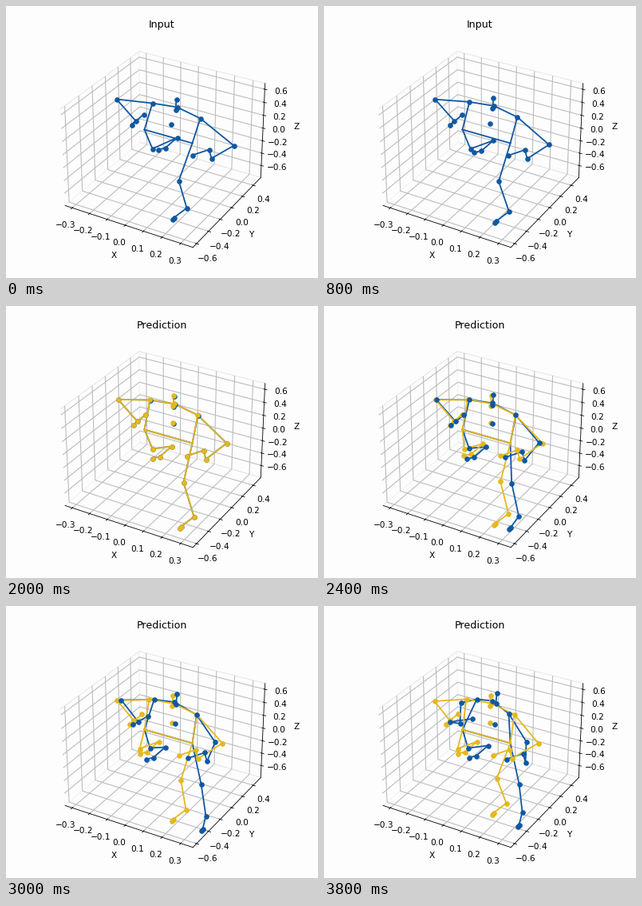
Write a matplotlib script that moves like this. It is 391 px wide and 340 px high and loops after 4 s.

```python
import numpy as np
import matplotlib.pyplot as plt
from matplotlib.animation import FuncAnimation

W, H, DPI = 391, 340, 72
STEP, FRAMES = 200, 20
START, SWITCH, MID, END = 0, 2000, 3000, 3800
BLUE, GOLD = "#1058a2", "#e6b81e"

# First pose, in screen pixels
POSE = dict(
    spine=(206, 147), neck=(214, 126), nose=(212, 129), top=(213, 116),
    r_shoulder=(183, 121), r_elbow=(138, 116), r_wrist=(162, 143),
    r_thumb=(157, 148), r_hand=(172, 135),
    l_shoulder=(243, 140), l_elbow=(285, 174), l_wrist=(257, 190),
    l_thumb=(254, 179), l_hand=(233, 186),
    r_knee=(183, 178), r_ankle=(214, 164), r_foot=(199, 177), r_toe=(190, 179),
    l_knee=(216, 218), l_ankle=(226, 252), l_foot=(210, 264), l_toe=(208, 266),
)
HIPS = dict(r_hip=(173, 154), l_hip=(233, 171))

CHAINS = [["r_hip", "l_hip"], ["neck", "nose", "top"]] + [
    [part if part == "neck" else f"{side}_{part}" for part in chain.split()]
    for side in "rl"
    for chain in ("hip knee ankle foot toe",
                  "hip shoulder",
                  "neck shoulder elbow wrist thumb hand")
]

HEAD = "neck nose top"
R_PALM, L_PALM = "r_wrist r_thumb r_hand", "l_wrist l_thumb l_hand"
R_SOLE, L_SOLE = "r_ankle r_foot r_toe", "l_ankle l_foot l_toe"

# Moves: joints, dx, dy, begin, finish, power of the ease
INPUT_MOVES = [
    ("spine", 3, -1, START, SWITCH, 1),
    (HEAD + " r_shoulder l_shoulder", -3, -4, START, SWITCH, 1),
    ("r_elbow " + R_PALM, 2, 0.5, START, SWITCH, 1),
    ("l_elbow", -9, -3, START, SWITCH, 1),
    (L_PALM, -7, 1, START, SWITCH, 1),
    (R_SOLE, -7, 11, START, SWITCH, 1.2),
    ("l_knee", 6, 2, START, SWITCH, 1),
    (L_SOLE, 9, 11, START, SWITCH, 1),
]
TRUE_MOVES = [
    ("spine", 4, 1, SWITCH, END, 0.8),
    ("neck", -1, -4, SWITCH, END, 0.8),
    ("nose top", 6, -4, SWITCH, END, 0.8),
    ("r_shoulder", 11, -1, SWITCH, END, 1.3),
    ("r_elbow", 31, 4, SWITCH, END, 3.5),
    ("r_wrist", 6, 3, SWITCH, END, 3),
    ("r_thumb", -2, -4, SWITCH, END, 3),
    ("r_hand", 11, 5, SWITCH, END, 2),
    ("l_shoulder", -9, -2, SWITCH, END, 3),
    ("l_elbow", -23, -2, SWITCH, END, 0.8),
    (L_PALM, 2, 4, SWITCH, END, 0.6),
    ("r_knee", -3, -1, SWITCH, MID, 0.6),
    (R_SOLE, -8, 1, SWITCH, MID, 0.6),
    (R_SOLE, 6, -2, MID, END, 1),
    ("l_knee", 22, 2, SWITCH, MID, 0.6),
    ("l_ankle", 15, -1, SWITCH, MID, 0.6),
    ("l_foot l_toe", 27, 3, SWITCH, MID, 0.7),
    (L_SOLE, -2, -5, MID, END, 1),
]
GUESS_MOVES = [
    ("spine r_shoulder l_shoulder " + HEAD, -2, -1, SWITCH - STEP, END, 1),
    ("r_elbow", -2, 2, SWITCH, END, 1),
    (R_PALM, -7, -1, SWITCH, END, 0.9),
    ("l_elbow", -8, 0, SWITCH, END, 0.7),
    (L_PALM, -15, -1, SWITCH, END, 0.7),
    ("r_knee", -16, 0, SWITCH, MID, 0.8),
    (R_SOLE, -16, -6, SWITCH, MID, 0.7),
    ("l_knee", -6, -5, SWITCH, END, 1),
    (L_SOLE, -10, -9, SWITCH, MID, 0.9),
    (L_SOLE, 3, -8, MID, END, 1),
]


def pose_at(t, moves):
    pts = {name: np.array(p, float) for name, p in POSE.items()}
    for names, dx, dy, begin, finish, power in moves:
        u = np.clip((t - begin) / (finish - begin), 0, 1) ** power
        for name in names.split():
            pts[name] += (dx * u, dy * u)
    # The standing foot wobbles once before the switch.
    wobble = 3 * np.sin(2 * np.pi * min(t / SWITCH, 1))
    for name in L_SOLE.split():
        pts[name][0] += wobble
    return pts


class Skeleton:
    def __init__(self, ax, moves, color, z):
        self.moves = moves
        self.lines = [ax.plot([], [], color=color, lw=1.8, zorder=z)[0] for _ in CHAINS]
        zeros = np.zeros(len(POSE))
        self.dots = ax.scatter(zeros, zeros, s=31, color=color, lw=1, zorder=z + 5)

    def show(self, on):
        for artist in [*self.lines, self.dots]:
            artist.set_visible(on)

    def update(self, t):
        pts = pose_at(t, self.moves)
        self.dots.set_offsets(list(pts.values()))
        pts.update(HIPS)
        for line, chain in zip(self.lines, CHAINS):
            line.set_data(*zip(*(pts[name] for name in chain)))


plt.rcParams.update({"grid.color": "#bcbcbc", "grid.linewidth": 1.1})
fig = plt.figure(figsize=(W / DPI, H / DPI), dpi=DPI, facecolor="#fdfdfd")

# Empty 3D box
side = 285
box = fig.add_axes([52.6 / W, 20.3 / H, side / W, side / H], projection="3d")
box.patch.set_visible(False)
box.set(xlim=(-0.341, 0.364), ylim=(-0.659, 0.545), zlim=(-0.797, 0.689))
box.set_xticks(np.arange(-3, 4) / 10)
box.set_yticks(np.arange(-3, 3) / 5)
box.set_zticks(np.arange(-3, 4) / 5)
box.tick_params(labelsize=10.5, pad=4.1)
for axis, name in zip((box.xaxis, box.yaxis, box.zaxis), "XYZ"):
    axis.set_label_text(name, fontsize=10.5)
    axis.labelpad = 5.25
    axis.set_pane_color("#fdfdfd")
    axis.pane.set_edgecolor("0.9")

# Flat layer in screen pixels
stage = fig.add_axes([0, 0, 1, 1], facecolor="none")
stage.axis("off")
truth = Skeleton(stage, INPUT_MOVES + TRUE_MOVES, BLUE, 2)
guess = Skeleton(stage, INPUT_MOVES + GUESS_MOVES, GOLD, 3)
title = stage.text(194.5, 27, "", fontsize=12.6, ha="center", va="baseline")
stage.set(xlim=(-0.5, W - 0.5), ylim=(H - 0.5, -0.5))


def draw(i):
    t = i * STEP
    predicting = t >= SWITCH
    title.set_text("Prediction" if predicting else "Input")
    truth.update(t)
    guess.update(t)
    guess.show(predicting)
    # Blue dots come to the front once the two poses part.
    truth.dots.set_zorder(9 if t > SWITCH else 7)
    return []


anim = FuncAnimation(fig, draw, frames=FRAMES, interval=STEP, repeat=True, repeat_delay=0)
plt.show()
```
